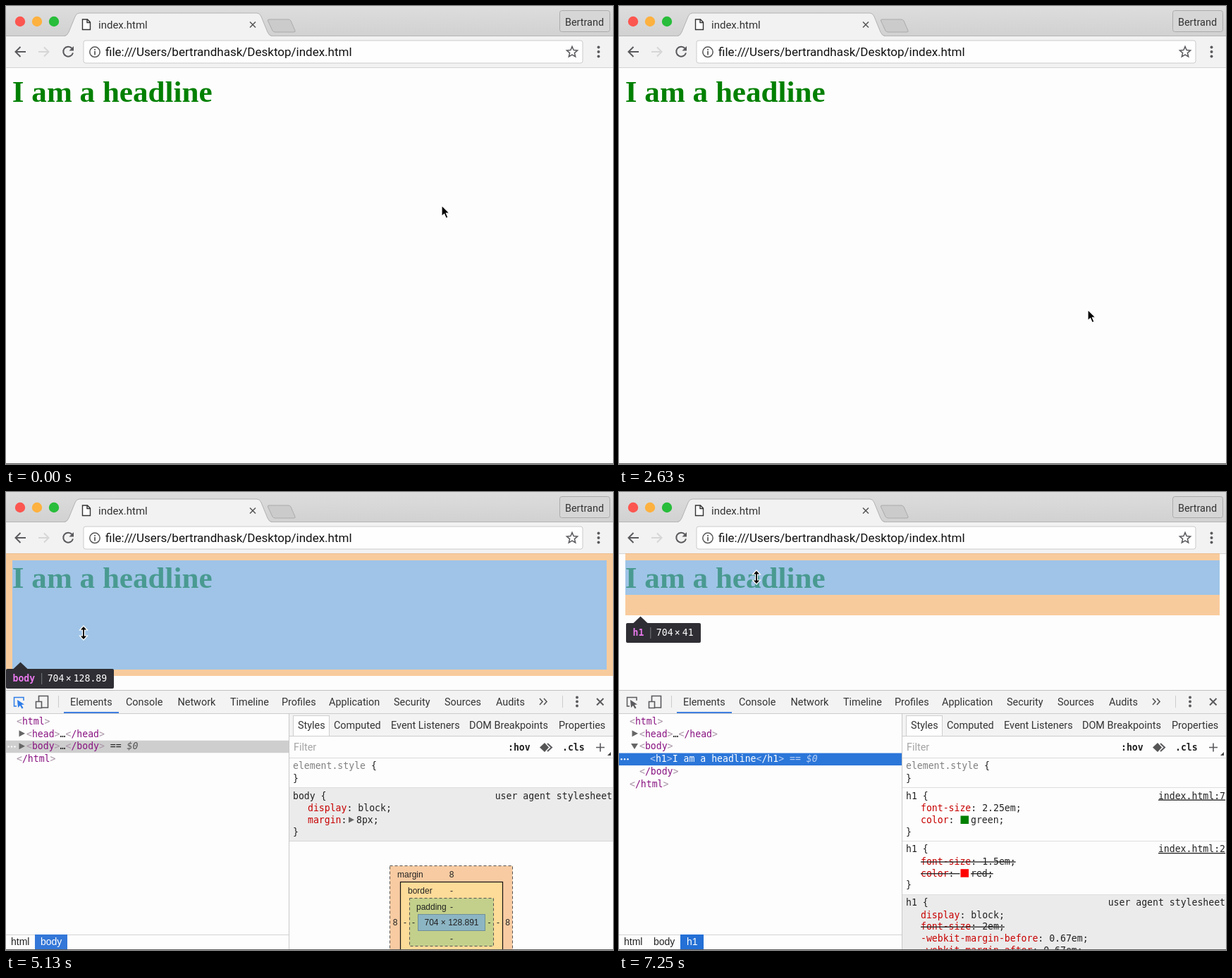
Animation of 861x650 px, one loop 7370 ms. Source, as an HTML page:

```html
<!DOCTYPE html>
<html lang="en">
<head>
<meta charset="utf-8">
<title>Inspecting a headline</title>
<style>
html, body { margin: 0; width: 100%; height: 100%; overflow: hidden; background: #fdfdfd; }
svg { display: block; }
text { white-space: pre; font: 14.4px Roboto, sans-serif; fill: #333; }
.mono { font: 13.16px "DejaVu Sans Mono", monospace; fill: #222; }
.bold { font-weight: bold; }
.small { font: 12px "Liberation Sans", Arial, sans-serif; fill: #222; }
.crumb { font: 14px "Liberation Sans", Arial, sans-serif; fill: #222; }
.item { font-size: 17.25px; }
.mid { text-anchor: middle; }
.end { text-anchor: end; }
.tag { fill: #881280; }
.br { fill: #a894a6; }
.dim { fill: #808080; }
.it { font-style: italic; fill: #555; }
.prop { fill: #c80000; }
.off { text-decoration: line-through; }
.link { text-decoration: underline; }
.white, .sel tspan { fill: #fff; }
.sel .br { fill: #b9cff4; }
.line { fill: none; stroke: #5a5a5e; stroke-width: 2; }
</style>
</head>
<body>
<svg id="stage" width="861" height="650" viewBox="0 0 861 650"></svg>
<script>
const LOOP = 7370, TICK = 125;
const stage = document.getElementById('stage');

// Markup helpers
const text = (x, y, s, cls = '') => `<text x="${x}" y="${y}" class="${cls}">${s}</text>`;
const mono = (x, y, s, cls = '') => text(x, y, s, 'mono ' + cls);
const span = (cls, s) => `<tspan class="${cls}">${s}</tspan>`;
const rect = (x, y, w, h, fill, more = '') =>
  `<rect x="${x}" y="${y}" width="${w}" height="${h}" fill="${fill}" ${more}/>`;
const path = (d, more = 'class="line"') => `<path d="${d}" ${more}/>`;
const dot = (x, y, r, fill) => `<circle cx="${x}" cy="${y}" r="${r}" fill="${fill}"/>`;
const group = (id, ...parts) => `<g id="${id}">${parts.join('')}</g>`;
const tag = name => span('br', '&lt;') + span('tag', name) + span('br', '&gt;');
const hline = (y, x1, x2, color) => rect(x1, y, x2 - x1, 1, color);

// Browser window
function chrome() {
  const star = Array.from({ length: 10 }, (_, i) => {
    const r = i % 2 ? 3.6 : 8, a = i * Math.PI / 5;
    return (803 + r * Math.sin(a)).toFixed(1) + ' ' + (65.5 - r * Math.cos(a)).toFixed(1);
  }).join('L');
  return `<defs>
    <linearGradient id="strip" x2="0" y2="1"><stop stop-color="#dddddd"/><stop offset="1" stop-color="#d1d1d1"/></linearGradient>
    <filter id="blur" x="-20%" y="-20%" width="140%" height="140%"><feGaussianBlur stdDeviation="7"/></filter>
    </defs>` +
    rect(0, 0, 861, 43, 'url(#strip)') + hline(42, 0, 861, '#b6b6b6') +
    rect(0, 43, 861, 44, '#f2f2f2') +
    path('M83 43Q87 42 89 37L98 15Q100 10 104 10H356Q360 10 362 15L371 37Q373 42 377 43Z', 'fill="#f2f2f2"') +
    path('M83 42.5Q87 42 89 37L98 15Q100 10 104 10H356Q360 10 362 15L371 37Q373 42 377 42.5', 'fill="none" stroke="#b2b2b2"') +
    path('M373 19H400Q403 19 404 21L410 35Q411 37 408 37H382Q379 37 378 35L371.5 21Q371 19 373 19Z', 'fill="#cbcbcb" stroke="#ababab"') +
    dot(20, 22, 7.2, '#fc5650') + dot(44, 22, 7.2, '#fdb13f') + dot(68, 22, 7.2, '#28bd3a') +
    path('M108.5 19H115.5L119.5 23V33.5H108.5ZM115 19V23.5H119.5', 'fill="#fff" stroke="#333" stroke-width="1.4"') +
    `<text x="131" y="31.5" style="font-size:15px">index.html</text>` +
    path('M346 22.5L354 30.5M354 22.5L346 30.5', 'stroke="#555" stroke-width="1.5"') +
    rect(785.5, 6.5, 71, 30, '#d6d6d6', 'rx="3" stroke="#ababab"') +
    text(820.5, 28, 'Bertrand', 'mid') +
    path('M28 65H14M20.5 58L13.5 65L20.5 72') +
    path('M46 65H60M54 58.5L60.5 65L54 71.5', 'fill="none" stroke="#d6d6d6" stroke-width="2"') +
    path('M93.5 60A7 7 0 1 0 95 66.5') + path('M96 57V63.5H89.5Z', 'fill="#5a5a5e"') +
    rect(110, 49, 708, 32, '#fefefe', 'rx="3" stroke="#cbcbcb"') +
    `<circle cx="126" cy="65.3" r="7.2" fill="none" stroke="#555" stroke-width="1.5"/>` +
    rect(125.2, 64, 1.7, 5.5, '#555') + rect(125.2, 61, 1.7, 1.8, '#555') +
    `<text x="141" y="71" style="font-size:17px;fill:#111">file:///Users/bertrandhask/Desktop/index.html</text>` +
    path('M' + star + 'Z', 'fill="none" stroke="#5a5a5e" stroke-width="1.5"') +
    [58.5, 65, 71.5].map(y => dot(840.5, y, 2, '#5a5a5e')).join('') +
    hline(87, 0, 861, '#d4d4d4') +
    `<text x="8.8" y="136" style="font:bold 43.1px 'Liberation Serif',Times,serif;fill:#008000">I am a headline</text>`;
}

// Page overlay label
function tip(x, y, name, w, h) {
  const sep = x + 18.5 + name.length * 7.92, wx = sep + 8.5, hx = wx + 37;
  const right = Math.round(hx + String(h).length * 7.92 + 10);
  return rect(x, y, right - x, 28, '#2e2e34', 'rx="2"') +
    path(`M${x + 10.5} ${y}l10 -9.5l10 9.5z`, 'fill="#2e2e34"') +
    mono(x + 9.5, y + 18, `<tspan fill="#e878ec">${name}</tspan>`, 'bold') +
    rect(sep, y + 6, 1, 16, '#77777f') +
    [[wx, w], [wx + 26, '×'], [hx, h]].map(([a, s]) => mono(a, y + 18, s, 'white')).join('');
}
const blue = (x, y, w, h) => rect(x, y, w, h, 'rgba(111,168,220,.66)');
const orange = d => path(d, 'fill="rgba(246,178,107,.66)" fill-rule="evenodd"');

function overlays() {
  return group('htmlOver', blue(0, 87, 861, 194), tip(0, 251, 'html', 720, 161)) +
    group('bodyOver', orange('M0 87H861V261H0ZM9 97V252H852V97Z'), blue(9, 97, 843, 155),
      tip(0, 251, 'body', 704, 128.89)) +
    group('h1Over', orange('M9 87H852V97H9ZM9 146H852V175H9Z'), blue(9, 97, 843, 49),
      tip(10, 186, 'h1', 704, 41));
}

// Context menu
const items = [['Back', 227], ['Forward', 250], ['Reload', 272.5], ['Save As...', 309.5], ['Print...', 332.5],
  ['Cast...', 355.5], ['Translate to English', 378], ['View Page Source', 415], ['Inspect', 438]];
function menu() {
  return group('menu',
    rect(607, 216, 200, 244, 'rgba(0,0,0,.3)', 'filter="url(#blur)"'),
    rect(606.5, 210.5, 200.5, 244.5, '#f2f2f2', 'rx="5" stroke="#c8c8c8"'),
    hline(291, 607, 807, '#dadada'), hline(396, 607, 807, '#dadada'),
    rect(607, 0, 200, 23, '#0a66dc', 'id="bar"'),
    ...items.map(([s, y]) => text(632, y + 6, s, 'item')));
}

// DevTools
const picker = color => path('M15 304H11.5V291.5H25V296', `fill="none" stroke="${color}" stroke-width="1.5"`) +
  path('M16 295L26 301.5L22 302L24.5 306.5L22.5 307.5L20 303L17 306Z', `fill="${color}"`);

function toolbar() {
  const tabs = [['Elements', 91], ['Console', 170], ['Network', 243.5], ['Timeline', 318], ['Profiles', 391],
    ['Application', 458], ['Security', 550], ['Sources', 622], ['Audits', 695]];
  return rect(0, 281, 861, 369, '#fdfdfd') + rect(0, 281, 861, 33, '#f3f3f3') +
    hline(281, 0, 861, '#c0c0c0') + hline(314, 0, 861, '#cccccc') +
    group('pickOff', picker('#5a5a5e')) + group('pickOn', picker('#2f7de8')) +
    path('M46.5 297V289.5H59.5V306H51M42.5 297.5H50.5V306.5H42.5Z', 'fill="none" stroke="#5a5a5e" stroke-width="1.6"') +
    rect(74, 289, 1, 17, '#ccc') + rect(789, 289, 1, 17, '#ccc') +
    tabs.map(([s, x]) => text(x, 302.5, s)).join('') + rect(82, 312, 78, 2, '#3f7fe0') +
    path('M757 293L761 297.5L757 302M763 293L767 297.5L763 302', 'fill="none" stroke="#555" stroke-width="1.6"') +
    [291.5, 297.5, 303.5].map(y => dot(810, y, 2, '#5a5a5e')).join('') +
    path('M838 293L847.5 302.5M847.5 293L838 302.5') +
    rect(401, 314, 1, 336, '#c8c8c8');
}

const rowY = i => 329.7 + i * 17.85;
const rowBar = (i, fill, w = 401) => rect(0, rowY(i) - 12.7, w, 17.5, fill);
const row = (i, x, s, cls) => mono(x, rowY(i), s, cls);
const closed = i => path(`M18.5 ${rowY(i) - 9.2}V${rowY(i) - .2}L27 ${rowY(i) - 4.7}Z`, 'fill="#666"');
const opened = i => path(`M17 ${rowY(i) - 8.5}H27L22 ${rowY(i) - .5}Z`, 'fill="#666"');
const dots = i => [3.5, 8, 12.5].map(x => dot(x, rowY(i) - 4, 1.2, '#fff')).join('');
const chosen = ' == ' + span('it', '$0');

function tree() {
  const h1 = tag('h1') + 'I am a headline' + tag('/h1');
  return group('htmlRow', rect(0, 317.5, 397, 17, '#ebeefb', 'rx="3"')) +
    group('bodyRow', rowBar(2, '#cecece'), dots(2)) +
    group('h1Hover', rowBar(3, '#e4eefa', 399)) +
    group('h1Row', rowBar(3, '#2b76d9'), dots(3)) +
    row(0, 15, tag('html')) + closed(1) + row(1, 29, tag('head') + '…' + tag('/head')) +
    group('folded', closed(2), row(2, 29, tag('body') + '…' + tag('/body') + chosen), row(3, 15, tag('/html'))) +
    group('unfolded', opened(2), row(4, 29, tag('/body')), row(5, 15, tag('/html'))) +
    group('bodyPick', row(2, 29, tag('body') + chosen), row(3, 44, h1), rect(22, 372, 1, 35, '#d2d2d8')) +
    group('h1Pick', row(2, 29, tag('body')), row(3, 44, h1 + span('br', ' == ') + span('it br', '$0'), 'sel white'));
}

function crumbs() {
  return hline(628, 0, 401, '#d4d4d4') +
    group('bodyCrumb', rect(41, 628, 46, 22, '#3377d8'), text(49, 643, 'body', 'crumb white')) +
    group('h1Crumb', rect(87, 628, 33, 22, '#2470d6'), text(49, 643, 'body', 'crumb'), text(96, 643, 'h1', 'crumb white')) +
    text(7, 643, 'html', 'crumb');
}

const rule = (y, name, from, link) => mono(407, y, name + ' {') + mono(860, y, from, 'end' + (link ? ' link' : ''));
const decl = (y, prop, val, off) => mono(428, y, span('prop', prop) + ': ' + val + ';', off ? 'off' : '');
const color = (y, swatch, off) => mono(428, y, span('prop', 'color') + ': ', off ? 'off' : '') +
  rect(484.5, y - 10.5, 11.5, 11.5, swatch) + mono(499, y, swatch + ';', off ? 'off' : '');

function boxModel() {
  const dash = 'stroke="#555" stroke-dasharray="4 3"';
  const label = (x, y, s) => text(x, y, s, 'small mid');
  return rect(544.5, 530.5, 174, 140, '#f8cba2', dash) + rect(559.5, 553.5, 145, 110, '#fddb98', 'stroke="#111" stroke-width="1.2"') +
    rect(572.5, 576.5, 119, 68, '#c3d08b', dash) + rect(584.5, 599.5, 95, 23, '#8cb5c4', 'stroke="#6f8f98"') +
    text(555, 547, 'margin', 'small') + text(570, 570, 'border', 'small') + text(582, 593, 'padding', 'small') +
    label(632, 615, '704 × 128.891') + label(632, 547, 8) + label(552, 615, 8) + label(711.5, 615, 8) +
    [[632, 570], [632, 593], [632, 638], [566, 615], [578, 615], [685.5, 615], [698, 615]]
      .map(([x, y]) => label(x, y, '-')).join('');
}

function styles() {
  const tabs = [['Styles', 414], ['Computed', 465], ['Event Listeners', 546], ['DOM Breakpoints', 657], ['Properties', 784]];
  return rect(402, 315, 459, 31, '#f3f3f3') + hline(346, 402, 861, '#cccccc') +
    rect(407.5, 317.5, 51, 29, '#fefefe', 'stroke="#cecece"') +
    tabs.map(([s, x]) => text(x, 336, s)).join('') +
    `<text x="408" y="367" style="fill:#a4a4a4">Filter</text>` +
    mono(712, 367, ':hov', 'bold') + mono(789, 367, '.cls', 'bold') +
    path('M764 356L770 362.5L764 369L757 362.5Z', 'fill="#555"') + path('M768 357L774 362.5L768 368', 'class="line"') +
    path('M837 362.5H849M843 356.5V368.5', 'stroke="#5a5a5e" stroke-width="1.6"') +
    path('M858 369V374H853Z', 'fill="#444"') + hline(377, 402, 861, '#dadada') +
    mono(407, 393, span('dim', 'element.style') + ' {') + mono(407, 410.5, '}') +
    group('bodyCss', rect(402, 420, 459, 75, '#ebebeb'), hline(419, 402, 861, '#dedede'), hline(495, 402, 861, '#d6d6d6'),
      rule(435.5, 'body', 'user agent stylesheet'), decl(453.3, 'display', 'block'),
      mono(428, 470, span('prop', 'margin') + ':'), path('M486 461V469.5L494 465.2Z', 'fill="#666"'),
      mono(497, 470, '8px;'), mono(407, 486.5, '}'), boxModel()) +
    group('h1Css', rect(402, 572, 459, 78, '#ebebeb'),
      ...[419, 495, 571].map(y => hline(y, 402, 861, '#dedede')),
      rule(435.5, 'h1', 'index.html:7', true), decl(453.3, 'font-size', '2.25em'), color(470, 'green'), mono(407, 486.5, '}'),
      rule(511, 'h1', 'index.html:2', true), decl(529, 'font-size', '1.5em', true), color(545.7, 'red', true), mono(407, 562, '}'),
      rule(586.5, 'h1', 'user agent stylesheet'), decl(604.5, 'display', 'block'), decl(621.3, 'font-size', '2em', true),
      decl(638, '-webkit-margin-before', '0.67em'), decl(654.8, '-webkit-margin-after', '0.67em'));
}

function pointer() {
  const bar = 'M-4 -9.5Q0 -9.5 0 -7Q0 -9.5 4 -9.5M0 -7V7M-4 9.5Q0 9.5 0 7Q0 9.5 4 9.5M-2 2H2';
  return group('pointer',
    group('arrow', path('M0 0V15.5L3.6 12.2L6.2 18.2L9 17L6.4 11.2H11Z', 'fill="#000" stroke="#fff" stroke-width="1.2"')),
    group('ibeam', path(bar, 'fill="none" stroke="#fff" stroke-width="3"'), path(bar, 'fill="none" stroke="#000" stroke-width="1.5"')),
    group('resize', path('M0 -10L5.5 -4H1.5V4H5.5L0 10L-5.5 4H-1.5V-4H-5.5Z', 'fill="#000" stroke="#fff" stroke-width="1.2"')));
}

stage.innerHTML = chrome() + overlays() + menu() +
  group('tools', toolbar(), group('panes', tree(), crumbs(), styles())) +
  hline(649, 0, 861, '#5c5c5c') + pointer();

// Visibility in ticks: pairs of start and end
const END = 60;
const shown = {
  menu: [7, 21], tools: [23, END], panes: [24, END],
  bodyOver: [26, 33, 41, 43], htmlOver: [33, 35, 40, 41], h1Over: [43, END],
  htmlRow: [33, 35, 40, 41], bodyRow: [24, 48], h1Hover: [43, 48], h1Row: [48, END],
  folded: [24, 43], unfolded: [43, END], bodyPick: [43, 48], h1Pick: [48, END],
  bodyCrumb: [24, 48], h1Crumb: [48, END], bodyCss: [24, 48], h1Css: [48, END],
  pickOff: [23, 38, 48, END], pickOn: [38, 48],
  arrow: [0, 28, 32, 34, 36, 40], ibeam: [28, 32], resize: [34, 36, 40, END]
};

// Pointer path: tick, x, y
const route = [[0, 618, 283], [1, 618, 283], [4, 611, 240], [6, 605, 209], [7, 605, 209], [8, 622, 250],
  [9, 651, 328], [10, 659, 349], [11, 664, 380], [13, 668, 412], [15, 666, 428], [17, 665, 431], [24, 665, 431],
  [28, 603, 434], [29, 601, 435], [30, 585, 430], [31, 440, 395], [32, 240, 355], [33, 110, 330], [34, 56.5, 315.5],
  [36, 22, 299], [38, 18, 298], [39, 19, 297], [40, 50, 262], [41, 110, 200], [42, 152, 163], [43, 174, 142],
  [44, 183, 134], [47, 195, 121], [END, 195, 121]];

function at(n) {
  const i = Math.max(1, route.findIndex(p => p[0] >= n));
  const [a, ax, ay] = route[i - 1], [b, bx, by] = route[i], k = (n - a) / (b - a);
  return [ax + (bx - ax) * k, ay + (by - ay) * k];
}

const el = id => document.getElementById(id);
const labels = [...el('menu').querySelectorAll('text')];

function render(t) {
  const n = Math.floor(t / TICK);
  for (const id in shown) {
    const on = shown[id].some((s, i, all) => i % 2 === 0 && n >= s && n < all[i + 1]);
    el(id).style.display = on ? '' : 'none';
  }
  el('pointer').setAttribute('transform', `translate(${at(n)})`);

  // The menu highlight trails the pointer by one tick and blinks on the click
  const y = at(Math.max(0, n - 1))[1];
  const pick = n === 19 ? -1 : items.findIndex(([s, c]) => s !== 'Forward' && Math.abs(y - c) <= 11.5);
  el('bar').style.display = pick < 0 ? 'none' : '';
  if (pick >= 0) el('bar').setAttribute('y', items[pick][1] - 11.5);
  labels.forEach((label, i) => {
    label.style.fill = i === pick ? '#fff' : items[i][0] === 'Forward' ? '#b6b6b6' : '#333';
  });
  el('menu').style.opacity = n === 20 ? .5 : 1;
}

const start = performance.now();
function loop() {
  render((performance.now() - start) % LOOP);
  requestAnimationFrame(loop);
}
loop();
</script>
</body>
</html>
```
